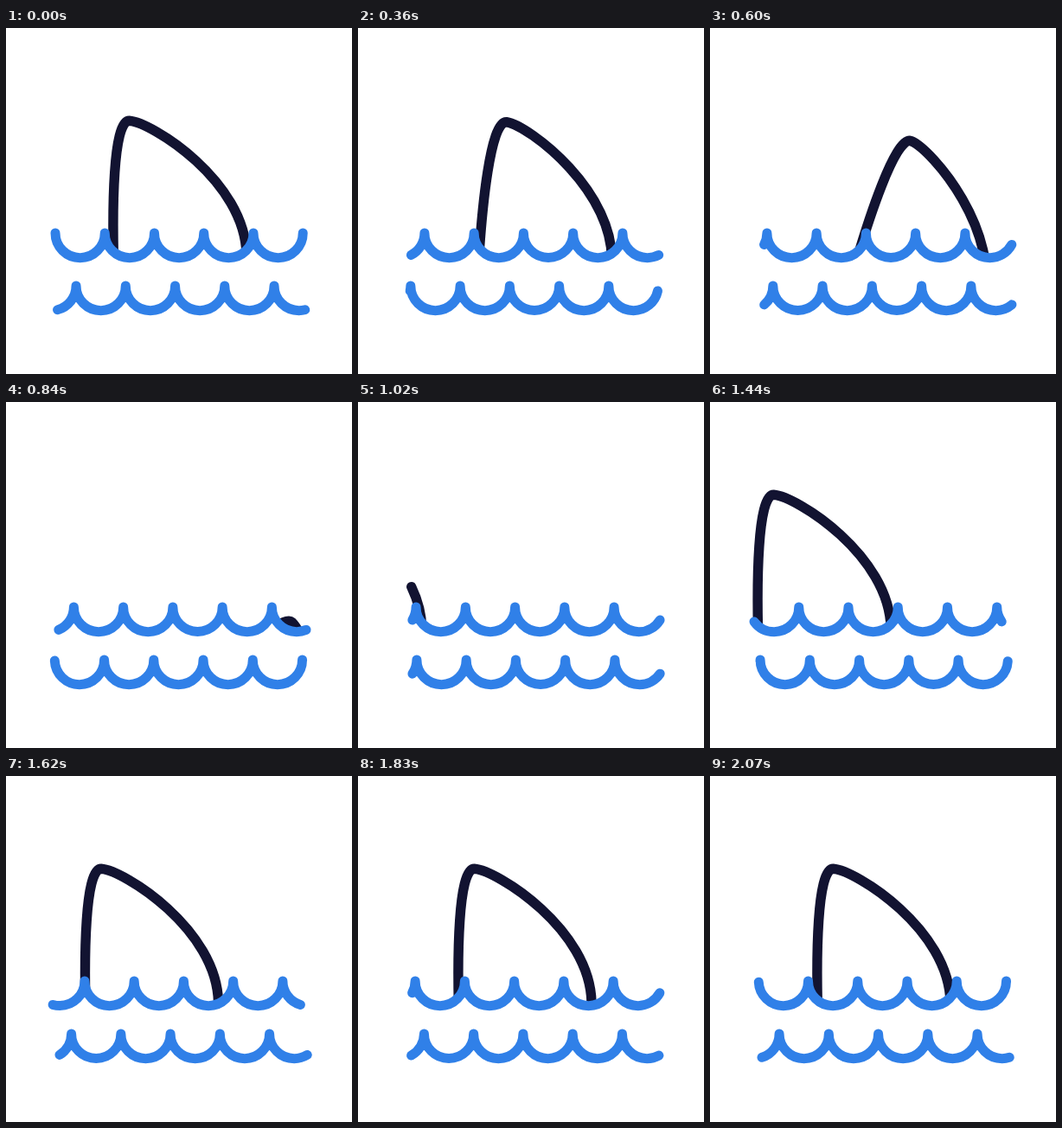
An HTML page that plays this animation: 400 by 400 pixels, repeating every 2100 ms.

```html
<!DOCTYPE html>
<html lang="en">
<head>
<meta charset="utf-8">
<title>Fin in the waves</title>
<style>
  html, body { margin: 0; width: 100%; height: 100%; overflow: hidden; background: #fff; }
  svg { display: block; width: 100%; height: 100%; }
  path { fill: none; stroke-width: 11; stroke-linecap: round; stroke-linejoin: round; }
  .wave { stroke: #3080e8; }
  #fin { stroke: #121331; stroke-width: 11.4; }
</style>
</head>
<body>
<svg viewBox="0 0 400 400">
  <clipPath id="air"><path id="surface"/></clipPath>
  <g clip-path="url(#air)">
    <path id="fin" pathLength="1"
      d="M279 275 L278 262 C276.5 177 168.5 109 142.5 107.3 C123 107 123.3 215 124.3 262 V275"/>
  </g>
  <path id="upper" class="wave" pathLength="6"/>
  <path id="lower" class="wave" pathLength="6"/>
</svg>
<script>
const LOOP = 2100, TURN = 1200, DIVE_END = 960;
const LEFT = 57, PITCH = 57.25, R = PITCH / 2;
const $ = id => document.getElementById(id);

// Share of the fin outline drawn while it surfaces: [ms, share]
const REVEAL = [[960, .04], [1080, .27], [1200, .43], [1340, .56], [1385, .68], [1440, 1]];

function lerpKeys(keys, t) {
  if (t <= keys[0][0]) return keys[0][1];
  for (let i = 1; i < keys.length; i++) {
    const [t0, v0] = keys[i - 1], [t1, v1] = keys[i];
    if (t < t1) return v0 + (v1 - v0) * (t - t0) / (t1 - t0);
  }
  return keys[keys.length - 1][1];
}

// Crests passed: speeding up until TURN, then slowing to rest
function crests(t, first, second) {
  if (t < TURN) {
    const x = t / TURN;
    return first * x ** (1.6785 - .325 * x);
  }
  const s = (LOOP - t) / (LOOP - TURN);
  return first + second * (1 - s ** (1.836 - .27 * s));
}

const arcs = (x, y, n) => `M${x} ${y}` + `a${R} ${R} 0 0 0 ${PITCH} 0`.repeat(n);

// Five arcs stay visible while the whole line slides to the right
function drawWave(id, y, phase) {
  const f = phase % 1;
  const el = $(id);
  el.setAttribute("d", arcs(LEFT + (f - 1) * PITCH, y, 6));
  el.setAttribute("stroke-dasharray", "5 20");
  el.setAttribute("stroke-dashoffset", f - 1);
  return f;
}

function drawFin(t) {
  let x, y = 0, turn = 0, shown = 1;
  if (t < DIVE_END) {
    const k = t / 840;
    x = 188 * k ** 2.2;
    y = 146 * k ** 5.5;
    turn = 40 * k ** 2.45;
  } else {
    const s = (LOOP - t) / 900;
    x = 29.6 * s ** 4 - 168.6 * s ** 2.5;
    shown = lerpKeys(REVEAL, t);
  }
  const fin = $("fin");
  fin.setAttribute("transform", `translate(${x} ${y}) rotate(${turn} 142 107)`);
  fin.setAttribute("stroke-dasharray", shown < 1 ? `${shown} 3` : "none");
}

function draw(t) {
  const f = drawWave("upper", 237, crests(t, 9, 7));
  drawWave("lower", 298, .42 + crests(t, 11, 9));
  const start = LEFT + (f - 2) * PITCH;
  $("surface").setAttribute("d", arcs(start, 237, 9) + `V0H${start}Z`);
  drawFin(t);
}

const begin = performance.now();
function tick() {
  draw((performance.now() - begin) % LOOP);
  requestAnimationFrame(tick);
}
tick();
</script>
</body>
</html>
```
